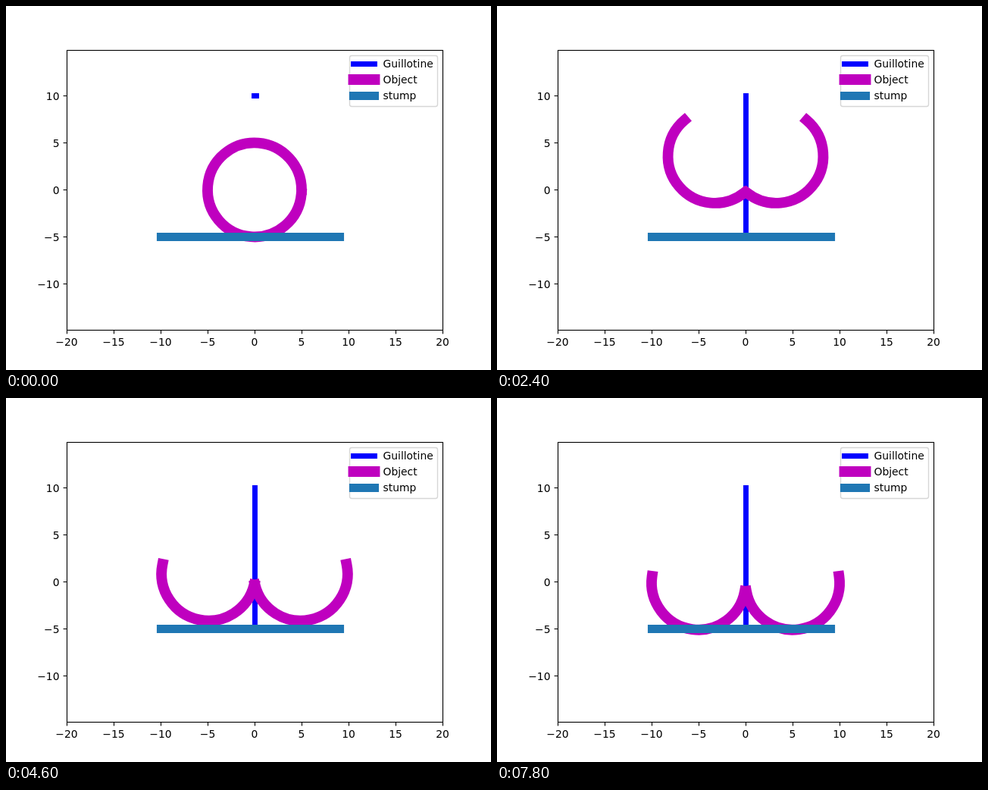
Animation, 640 px wide and 480 px high, one loop 7.9 s. Source, as an HTML page with a canvas:

```html
<!DOCTYPE html>
<html lang="en">
<head>
<meta charset="utf-8">
<title>Guillotine plot</title>
<style>
html, body { margin: 0; width: 100%; height: 100%; overflow: hidden; background: #fff; }
canvas { display: block; }
</style>
</head>
<body>
<canvas id="plot" width="640" height="480"></canvas>
<script>
const ctx = document.getElementById('plot').getContext('2d');
const UNIT = 12.4, X0 = 328, Y0 = 242.4, RADIUS = 5;
const STEP = 100, STEPS = 79, LANDED = 15, SPLIT = 17;
const BLUE = '#0000ff', PURPLE = '#bf00bf', TEAL = '#1f77b4';
const THIN = 6.94, THICK = 13.89, MID = 11.11;

// Tilt of the halves while they rock on the stump: [step after split, degrees]
const ROCK = [[31, 8.07], [37, -2.2], [43, 13.8], [47, 6], [53, -4.5], [61, 8]];

const snap = v => Math.floor(v + 0.5) + 0.5;
const px = x => X0 + x * UNIT;
const py = y => Y0 - y * UNIT;

function line(x1, y1, x2, y2, color, width, cap = 'square') {
  ctx.strokeStyle = color;
  ctx.lineWidth = width;
  ctx.lineCap = cap;
  ctx.beginPath();
  ctx.moveTo(x1, y1);
  ctx.lineTo(x2, y2);
  ctx.stroke();
}

function arc(x, y, from, to) {
  ctx.strokeStyle = PURPLE;
  ctx.lineWidth = THICK;
  ctx.lineCap = 'square';
  ctx.beginPath();
  ctx.arc(x, y, RADIUS * UNIT, from, to);
  ctx.stroke();
}

function label(text, x, y, align) {
  ctx.fillStyle = '#000';
  ctx.font = '13.89px "DejaVu Sans", sans-serif';
  ctx.textAlign = align;
  ctx.textBaseline = 'alphabetic';
  ctx.fillText(text, x, y);
}

function blade(step) {
  const y = snap(py(10 - Math.min(step, LANDED)));
  line(328.5, 118.5, 328.5, y, BLUE, THIN);
  if (step < LANDED) line(327.5, y, 330.5, y, BLUE, THIN);
}

function rockTilt(t) {
  const i = Math.max(1, ROCK.findIndex(k => t <= k[0]));
  const [t0, a0] = ROCK[i - 1], [t1, a1] = ROCK[i];
  return a0 + (a1 - a0) * (t - t0) / (t1 - t0);
}

// Turn and centre of the right half; the left one mirrors it
function pose(t) {
  if (t > 31) {
    const turn = (90 - rockTilt(t)) * Math.PI / 180;
    const y = t < 36 ? RADIUS * Math.cos(turn) - 0.12 : -0.1;
    return { turn, x: t < 36 ? RADIUS * Math.sin(turn) : RADIUS, y };
  }
  const turn = 0.5 + 0.03 * t;
  const pivot = Math.min(-1.6 + 0.2 * t, -0.13);
  return { turn, x: RADIUS * Math.sin(turn), y: RADIUS * Math.cos(turn) + pivot };
}

function object(step) {
  if (step < SPLIT) {
    arc(X0, Y0, -6.2, 0);
    return;
  }
  const { turn, x, y } = pose(step - SPLIT);
  const from = turn - Math.PI / 2;
  for (const side of [-1, 1]) {
    ctx.save();
    ctx.translate(X0, Y0);
    ctx.scale(side, 1);
    arc(x * UNIT, -y * UNIT, from, from + 3.1);
    ctx.restore();
  }
}

function axes() {
  ctx.strokeStyle = '#000';
  ctx.lineWidth = 1.11;
  ctx.strokeRect(80.5, 58.5, 496, 369);
  const name = v => String(v).replace('-', '\u2212');
  for (let v = -20; v <= 20; v += 5) {
    const x = snap(px(v));
    line(x, 428, x, 432.4, '#000', 1.11, 'butt');
    label(name(v), px(v), 448, 'center');
  }
  for (let v = -10; v <= 10; v += 5) {
    const y = snap(py(v));
    line(75.6, y, 80, y, '#000', 1.11, 'butt');
    label(name(v), 70.5, Math.round(py(v) + 5.3), 'right');
  }
}

function legend() {
  ctx.beginPath();
  ctx.roundRect(453.5, 65.5, 116, 67, 2.8);
  ctx.fillStyle = 'rgba(255,255,255,0.8)';
  ctx.fill();
  ctx.strokeStyle = 'rgba(204,204,204,0.8)';
  ctx.lineWidth = 1.39;
  ctx.stroke();
  const rows = [
    ['Guillotine', 76.5, BLUE, THIN, 81],
    ['Object', 97, PURPLE, THICK, 102],
    ['stump', 118.5, TEAL, MID, 123]
  ];
  for (const [text, y, color, width, base] of rows) {
    line(458.5, y, 486.5, y, color, width);
    label(text, 497.5, base, 'left');
  }
}

function draw(now) {
  const step = Math.floor(now / STEP) % STEPS;
  ctx.fillStyle = '#fff';
  ctx.fillRect(0, 0, 640, 480);
  blade(step);
  object(step);
  line(204.5, 304.5, 440.5, 304.5, TEAL, MID);
  axes();
  legend();
}

const start = performance.now();
function tick() {
  draw(performance.now() - start);
  requestAnimationFrame(tick);
}
tick();
</script>
</body>
</html>
```
